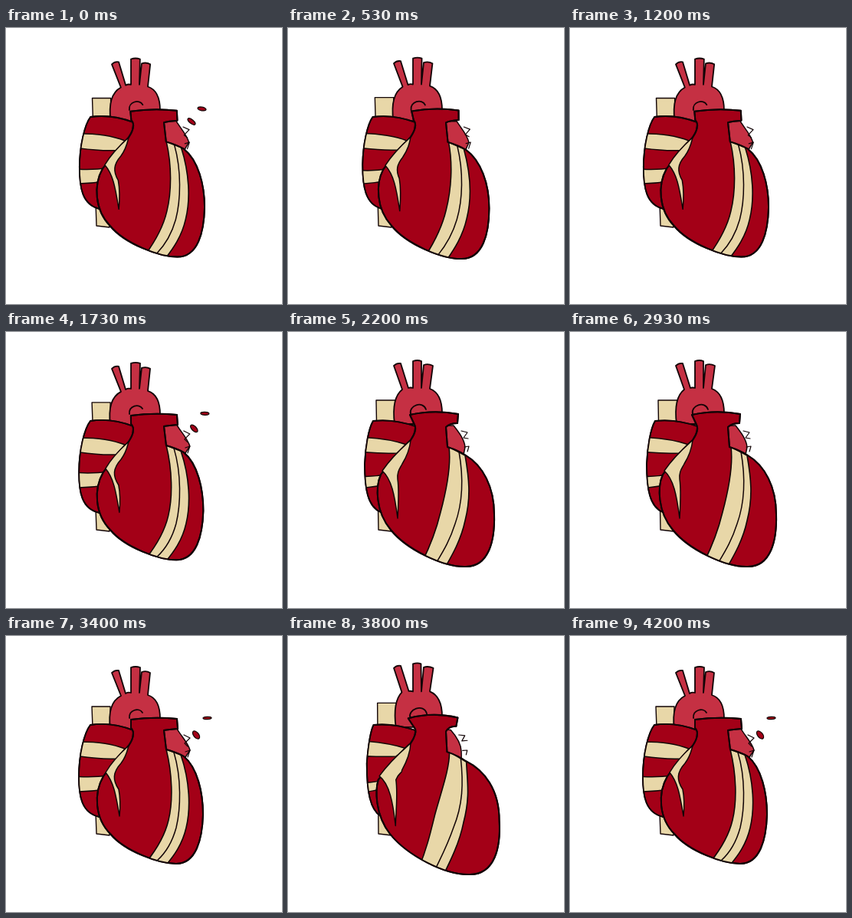
These frames come from a looping animation (360 by 360 pixels, 4.27 s). An HTML page with a canvas:

```html
<!DOCTYPE html>
<html lang="en">
<head>
<meta charset="utf-8">
<title>Beating heart</title>
<style>
html, body { margin: 0; width: 100%; height: 100%; overflow: hidden; background: #fff; }
canvas { display: block; }
</style>
</head>
<body>
<canvas id="stage" width="360" height="360"></canvas>
<script>
const ctx = document.getElementById('stage').getContext('2d');
const RED = '#a30017', PINK = '#c53043', CREAM = '#e8d7a8', INK = '#120406';
const LOOP = 4270, STEPS = 64, BEAT = 11.7;

// One beat: fullness of each drawing (0 squeezed, 1 filled) and how far the drops have flown.
const POSES = [
  { fill: 1.55 }, { fill: .17, drops: 0 }, { fill: .03, drops: .55 }, { fill: 0, drops: 1 },
  { fill: .17 }, { fill: .45 }, { fill: 1 }
];

// Each part: squeezed outline, filled outline, colour, line width.
const VEIN = ['M112 92 L136 92 L135 260 L118 258 Z', 'M115 89 L140 89 L135 260 L118 258 Z', CREAM, 1.4];

const AORTA = [
  'M136 122 C133 98 138 84 150 78 L138 48 Q142 44 147 45 L156 75 Q159 73 163 74 L163 41 Q169 39 175 41 L174 74 L177 47 Q183 45 188 48 L185 77 Q201 82 201 108 L195 122 Z',
  'M139 120 C136 96 140 82 149 75 L138 44 Q142 40 147 41 L157 73 Q160 72 163 73 L163 38 Q169 36 174 38 L174 73 L177 43 Q183 41 189 44 L185 74 Q201 80 201 106 L195 120 Z',
  PINK, 1.8];
const CURL = ['M161 107 C160 96 174 93 178 100', 'M160 107 C157 96 176 89 180 101', null, 1.8];

const ATRIUM = [
  'M166 123 Q138 112 110 116 C102 126 95 155 95 183 C95 208 98 231 122 236 L150 190 L165 140 Z',
  'M166 123 Q138 113 111 116 C105 126 101 150 100 172 C100 205 104 228 121 235 L150 190 L165 140 Z',
  RED, 1.8];
const BANDS = [
  ['M90 138 Q130 137 155 147 L144 160 Q122 161 90 156 Z', 'M90 137 Q130 138 155 147 L142 158 Q122 159 90 156 Z', CREAM, 1.5],
  ['M90 183 Q110 185 135 182 L130 200 Q110 203 90 203 Z', 'M90 188 Q110 190 130 185 L130 198 Q112 203 90 204 Z', CREAM, 1.5]
];

const EAR = [
  'M203 122 L223 121 C228 130 238 140 240 149 L234 158 L208 152 Z',
  'M204 122 L216 122 C223 131 230 140 231 150 L229 160 L207 153 Z',
  PINK, 1.5];
const TRAIL = [
  'M232 129 L240 133 L233 140 L237 144 M234 151 L240 149 L237 158',
  'M226 129 L234 131 L229 138 L235 139 M230 150 L236 149 L234 156',
  null, 1.2];

const BODY = [
  'M163 109 Q193 105 223 108 L224 121 Q212 122 206 123 L209 148 Q223 152 232 157 C250 172 257 205 257 233 C256 265 248 297 222 297 C200 297 155 281 136 258 C116 238 114 205 127 183 C138 168 154 150 160 143 C166 134 169 126 163 120 Z',
  'M159 108 Q190 101 222 107 L221 119 Q211 119 206 124 L208 150 Q223 155 232 161 C254 174 269 202 269 238 C270 272 262 306 232 306 C203 307 155 284 134 258 C114 234 114 202 121 186 C136 166 150 150 160 141 C166 132 168 126 165 121 L160 117 Z',
  RED, 2];
const STRIPE = [
  'M209 148 C217 180 218 215 212 240 C207 262 195 280 183 295 L206 302 C219 287 230 272 235 250 C241 225 240 190 228 155 Z',
  'M210 150 C213 175 207 205 199 235 C193 260 186 278 175 300 L202 312 C215 290 226 270 231 246 C239 215 236 190 231 161 Z',
  CREAM, 1.6];
const SEAM = [
  'M219 152 C229 185 228 225 222 250 C216 272 206 285 197 293',
  'M223 156 C229 190 228 222 218 250 C211 272 203 285 194 300',
  null, 1.5];
const BRANCH = [
  'M160 143 C150 152 138 164 130 178 C140 190 143 205 148 235 C150 215 148 205 147 200 C139 188 139 178 150 166 C157 157 158 150 160 143 Z',
  'M160 141 C150 150 136 162 123 181 C135 192 139 212 143 243 C144 225 145 205 143 192 C142 182 146 178 149 172 C157 159 159 150 160 141 Z',
  CREAM, 1.5];

const mix = (a, b, k) => a + (b - a) * k;

function morph(from, to, k) {
  const ends = to.match(/\d+/g);
  let i = 0;
  return new Path2D(from.replace(/\d+/g, n => mix(+n, +ends[i++], k)));
}

function paint([from, to, colour, width], k) {
  const path = morph(from, to, k);
  if (colour) {
    ctx.fillStyle = colour;
    ctx.fill(path);
  }
  ctx.lineWidth = width;
  ctx.stroke(path);
}

// Paints a part with details clipped to it, then its outline again on top.
function paintWith(part, details, k) {
  const [from, to, , width] = part;
  paint(part, k);
  ctx.save();
  ctx.clip(morph(from, to, k));
  details.forEach(detail => paint(detail, k));
  ctx.restore();
  paint([from, to, null, width], k);
}

function paintDrop(x, y, angle, rx, ry) {
  ctx.beginPath();
  ctx.ellipse(x, y, rx, ry, angle, 0, 2 * Math.PI);
  ctx.fillStyle = RED;
  ctx.fill();
  ctx.lineWidth = 1.3;
  ctx.stroke();
}

function draw(step) {
  const turn = ((step + 1.85) % BEAT) / BEAT;
  const { fill, drops } = POSES[Math.floor(turn * POSES.length)];
  ctx.fillStyle = '#fff';
  ctx.fillRect(0, 0, 360, 360);
  ctx.strokeStyle = INK;
  ctx.lineJoin = ctx.lineCap = 'round';

  paint(VEIN, fill);
  paint(AORTA, fill);
  paint(CURL, fill);
  paintWith(ATRIUM, BANDS, fill);
  paint(EAR, fill);
  paint(TRAIL, fill);
  paintWith(BODY, [STRIPE, SEAM], fill);
  paint(BRANCH, fill);

  if (drops !== undefined) {
    paintDrop(mix(242, 248, drops), mix(122, 129, drops), mix(.65, .9, drops), 6, mix(2.5, 3.3, drops));
    paintDrop(mix(255.5, 262.5, drops), mix(105.5, 107, drops), mix(.15, -.05, drops), 5.5, mix(2.3, 1.7, drops));
  }
}

const start = performance.now();
function tick() {
  const t = (performance.now() - start) % LOOP;
  draw(Math.floor(t / LOOP * STEPS + .2) % STEPS);
  requestAnimationFrame(tick);
}
tick();
</script>
</body>
</html>
```
